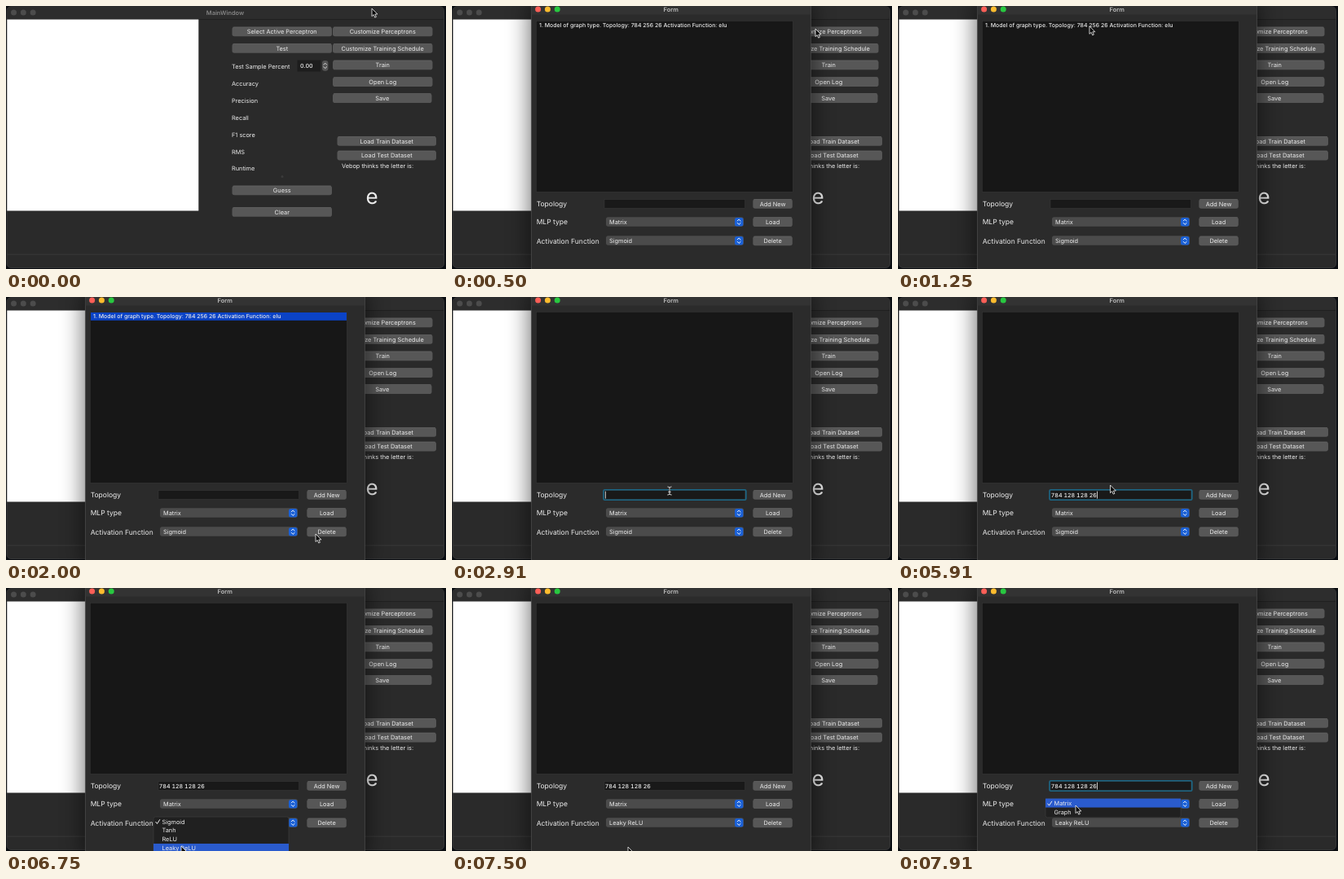
Recreate the animation shown at these times as an HTML page. Size 540 px wide and 323 px high, loop 8000 ms.

```html
<!DOCTYPE html>
<html lang="en">
<head>
<meta charset="utf-8">
<title>Perceptron setup</title>
<style>
  html, body { margin: 0; width: 100%; height: 100%; overflow: hidden; background: #090c10; }
  svg { display: block; width: 540px; height: 323px; }
  text { font: 400 7.35px Inter, "Open Sans", sans-serif; fill: #ececec; white-space: pre; text-rendering: geometricPrecision; }
  .title { font-size: 7.4px; font-weight: 600; }
  .label { font-size: 8.5px; }
  .row { font-size: 6.95px; font-weight: 500; }
  .digits { font-size: 7.1px; font-weight: 500; font-feature-settings: "tnum"; }
  .letter { font-size: 26px; }
</style>
</head>
<body>
<svg id="stage" viewBox="0 0 540 323"></svg>
<script>
const LOOP = 8000, TICK = 1000 / 12;
const stage = document.getElementById('stage');

// Drawing helpers: each returns SVG markup
const rect = (x, y, w, h, fill, r = 0, more = '') =>
  `<rect x="${x}" y="${y}" width="${w}" height="${h}" rx="${r}" fill="${fill}" ${more}/>`;
const text = (x, y, str, cls = '', more = '') => `<text x="${x}" y="${y}" class="${cls}" ${more}>${str}</text>`;
const centred = (x, y, str, cls = '', more = '') => text(x, y, str, cls, `text-anchor="middle" ${more}`);
const line = (d, stroke, width, more = '') =>
  `<path d="${d}" fill="none" stroke="${stroke}" stroke-width="${width}" stroke-linecap="round" stroke-linejoin="round" ${more}/>`;
const group = (id, body, more = '') => `<g id="${id}" ${more}>${body}</g>`;
const lights = (x, y, colors) =>
  colors.map((c, i) => `<circle cx="${x + i * 11.8}" cy="${y}" r="3.5" fill="${c}"/>`).join('');
const chevrons = (x, y, color) =>
  line(`M${x - 1.9} ${y - 1.3}l1.9-1.9 1.9 1.9M${x - 1.9} ${y + 1.3}l1.9 1.9 1.9-1.9`, color, 1);

function button(x, cy, w, label, id = '') {
  return rect(x, cy - 5.8, w, 11.6, '#575757', 2.8, id && `id="${id}"`) +
    rect(x + 1, cy - 5.8, w - 2, .6, '#686868') + centred(x + w / 2, cy + 2.6, label);
}

function combo(cy, label, id) {
  return rect(189, cy - 5.8, 169, 11.6, '#4b4b4b', 2.8) + text(193, cy + 2.5, label, '', `id="${id}"`) +
    rect(347, cy - 5, 10.4, 10.4, '#1a60d6', 2.5) + chevrons(352.2, cy + .2, '#fff');
}

function popup(id, top, step, items) {
  const body = rect(181, top, 166, step * items.length + 2, '#202020', 2.5, 'stroke="#414141" stroke-width=".6"') +
    rect(181, 0, 166, step + .3, '#2a5bcd', 0, 'class="hover"') +
    line(`M183.8 ${top + step / 2 + 1}l1.7 2.2 3.2-5`, '#eee', 1) +
    items.map((s, i) => text(191.5, top + 1 + step * (i + .5) + 2.3, s)).join('');
  return group(id, body);
}

const metrics = ['Test Sample Percent', 'Accuracy', 'Precision', 'Recall', 'F1 score', 'RMS', 'Runtime'];
const mainWindow =
  rect(1, .7, 536.5, 320.8, '#2a2a2a', 5, 'stroke="#484848" stroke-width=".6"') +
  rect(1.4, 1, 535.7, 15, '#2d2d2d', 4.5) + rect(1.4, 16, 535.7, .6, '#191919') +
  lights(9.5, 8, ['#4c4c4c', '#4c4c4c', '#4c4c4c']) +
  centred(269, 10.8, 'MainWindow', 'title', 'style="fill:#858585"') +
  rect(1.3, 16.5, 235, 235, '#fff') + rect(1.4, 304.7, 535.7, .7, '#414141') +
  [['Select Active Perceptron', 31.5], ['Test', 52], ['Guess', 226.5], ['Clear', 253]]
    .map(([s, y]) => button(277.5, y, 122.5, s)).join('') +
  [['Customize Perceptrons', 31.5], ['Customize Training Schedule', 52], ['Train', 72.5], ['Open Log', 93.3], ['Save', 113.2]]
    .map(([s, y]) => button(401, y, s === 'Save' ? 121.5 : 122.5, s)).join('') +
  button(406.5, 166, 121.5, 'Load Train Dataset') + button(406.5, 183.6, 121.5, 'Load Test Dataset') +
  metrics.map((s, i) => text(277, 77 + i * 20.9, s)).join('') +
  rect(357.5, 66.5, 28.5, 14, '#1d1d1d') + text(361, 76.3, '0.00', 'digits') +
  rect(388, 67, 7.4, 12.8, '#555', 3) + chevrons(391.7, 73.4, '#ddd') +
  rect(337.5, 208, 3, 3, '#3b3b3b', 1.5) +
  text(412, 198.6, 'Vebop thinks the letter is:') + centred(449, 243, 'e', 'letter');

const form =
  rect(95, -8, 347, 340, '#000', 6, 'opacity=".55" filter="url(#blur)"') +
  rect(97.3, -12, 343, 350, '#2b2b2b', 0, 'stroke="#515151" stroke-width=".7"') +
  rect(97.7, 0, 342.2, 10.6, '#333') + lights(105.6, 4, ['#ff5f57', '#febc2e', '#28c840']) +
  centred(268.7, 6.6, 'Form', 'title', 'style="fill:#bdbdbd"') +
  rect(103.3, 18.3, 315, 210, '#171717', 0, 'stroke="#383838" stroke-width=".5"') +
  group('model', rect(104, 19, 314, 9.8, '#0b43c6', 0, 'id="selected"') +
    text(107, 26.4, '1. Model of graph type. Topology: 784 256 26 Activation Function: elu', 'row')) +
  [['Topology', 246.2], ['MLP type', 268.2], ['Activation Function', 291.6]]
    .map(([s, y]) => text(103.7, y, s, 'label')).join('') +
  rect(187, 237.7, 172.5, 10.6, '#191919', 0, 'stroke="#393939" stroke-width=".5"') +
  rect(186, 236.8, 174.8, 12.4, 'none', 1.5, 'id="ring" stroke="#1b6786" stroke-width="1.6"') +
  text(187.7, 245.6, '', 'digits', 'id="topology"') + rect(0, 238.6, .8, 9, '#f2f2f2', 0, 'id="caret"') +
  button(369.3, 243, 48.5, 'Add New') + button(369.3, 265.2, 48.5, 'Load') + button(369.3, 288.5, 48.5, 'Delete', 'delete') +
  combo(265, 'Matrix', 'mlp') + combo(288, 'Sigmoid', 'activation') +
  popup('activationMenu', 281, 10.65, ['Sigmoid', 'Tanh', 'ReLU', 'Leaky ReLU', 'ELU']) +
  popup('mlpMenu', 258.6, 10.65, ['Matrix', 'Graph']);

const arrow = '<path d="M0 0v9.6l2.2-2 1.5 3.5 1.7-.7-1.5-3.4h3z" fill="#0a0a0a" stroke="#f5f5f5" stroke-width=".8" stroke-linejoin="round"/>';
const beamPath = 'M-2.3-5Q0-5 0-3.8Q0-5 2.3-5M0-4v8M-2.3 5Q0 5 0 3.8Q0 5 2.3 5M-1.3 1.4h2.6';

stage.innerHTML =
  '<defs><filter id="blur" x="-30%" y="-30%" width="160%" height="160%"><feGaussianBlur stdDeviation="14"/></filter></defs>' +
  mainWindow + group('form', form) +
  group('pointer', group('arrow', arrow) + group('beam', line(beamPath, '#111', 1.8) + line(beamPath, '#eee', .9)));

const el = Object.fromEntries([...stage.querySelectorAll('[id]')].map(n => [n.id, n]));
const show = (name, on) => { el[name].style.display = on ? '' : 'none'; };

// Pointer stops: tick, x, y
const path = [
  [0, 449, 3], [2, 446, 27], [5, 446, 27], [6, 446, 28], [14, 236, 25], [17, 232, 24],
  [24, 380, 291], [27, 379, 288], [30, 379, 288], [34, 267, 238], [69, 268, 238],
  [71, 260.5, 231], [75, 216, 289], [77, 216, 287], [81, 215, 317], [86, 216, 318],
  [90, 216, 318], [94, 218, 267], [96, 218, 267]
];
const typed = '784 128 128 26';
const keyTicks = [45, 49, 50, 52, 55, 57, 58, 59, 61, 62, 63, 65, 68, 69];
const within = (k, from, to) => k >= from && k < to;

function pointerAt(k) {
  const i = path.findIndex((p, n) => n === path.length - 2 || k < path[n + 1][0]);
  const [a, x, y] = path[i], [b, x2, y2] = path[i + 1];
  const p = (k - a) / (b - a), e = p * p * (3 - 2 * p);
  return [x + (x2 - x) * e, y + (y2 - y) * e];
}

function hover(menu, top, count, y) {
  const row = Math.max(0, Math.min(count - 1, Math.floor((y - top - 1) / 10.65)));
  el[menu].querySelector('.hover').setAttribute('y', top + row * 10.65 + (row ? 1 : 0));
}

function draw(k) {
  const [x, y] = pointerAt(k);
  el.pointer.setAttribute('transform', `translate(${x} ${y})`);
  const beam = within(k, 34, 45) || within(k, 69, 71);
  show('beam', beam);
  show('arrow', !beam && !within(k, 45, 69));

  show('form', k >= 5);
  el.form.setAttribute('opacity', k === 5 ? .6 : 1);
  el.form.setAttribute('transform', k === 5 ? 'translate(13.5 8) scale(.95)' : '');
  show('model', k < 30);
  show('selected', k >= 16);
  el.delete.setAttribute('fill', k === 29 ? '#777' : '#575757');

  const count = keyTicks.filter(t => t <= k).length;
  el.topology.textContent = typed.slice(0, count);
  const focused = within(k, 35, 78) || k >= 91;
  show('ring', focused);
  show('caret', focused && !within(k, 41, 45) && !within(k, 75, 78));
  el.caret.setAttribute('x', 187.9 + (count && k >= 35 ? el.topology.getComputedTextLength() : 0));

  el.activation.textContent = k >= 90 ? 'Leaky ReLU' : 'Sigmoid';
  show('activationMenu', within(k, 77, 90));
  show('mlpMenu', k >= 94);
  hover('activationMenu', 281, 5, y);
  hover('mlpMenu', 258.6, 2, 262);
}

const start = performance.now();
let last = -1;
function frame() {
  const t = (performance.now() - start) % LOOP;
  const k = Math.min(95, Math.floor((t + 7) / TICK));
  if (k !== last) draw(last = k);
  requestAnimationFrame(frame);
}
frame();
</script>
</body>
</html>
```
